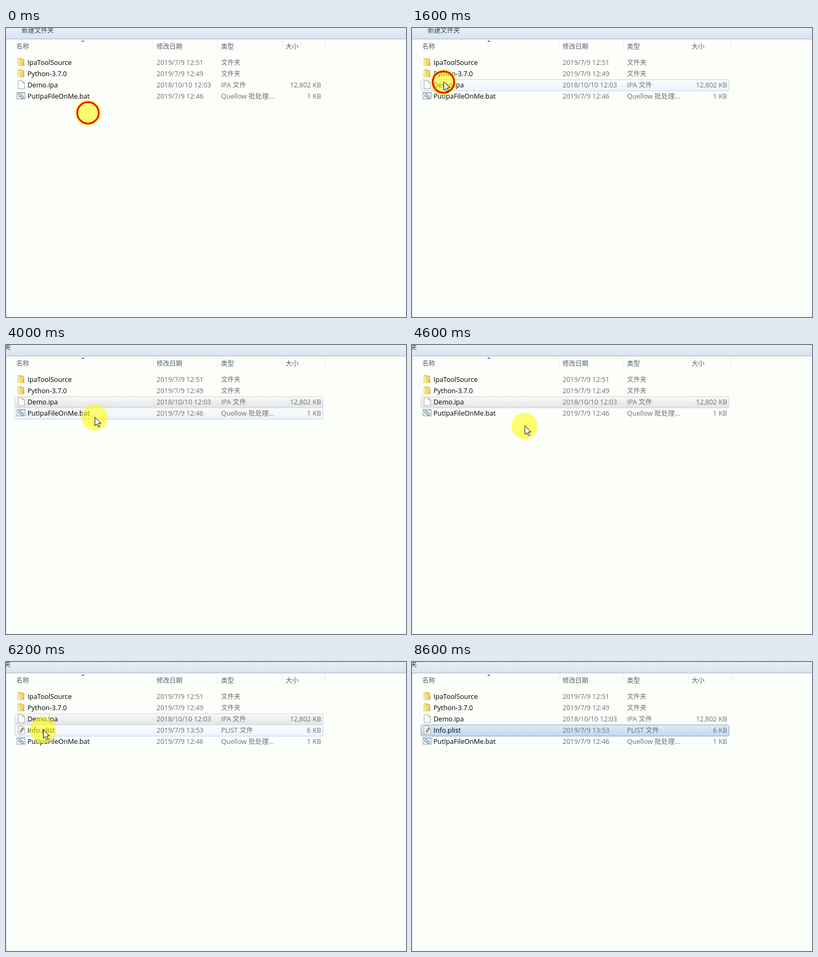
An HTML page with a canvas for the animation above (8800 ms loop, 744 by 540 pixels).

```html
<!DOCTYPE html>
<html lang="zh">
<head>
<meta charset="utf-8">
<style>
html, body { margin: 0; width: 100%; height: 100%; overflow: hidden; background: #fcfefa; }
canvas { display: block; }
</style>
</head>
<body>
<canvas id="stage" width="744" height="540"></canvas>
<script>
const ctx = document.getElementById('stage').getContext('2d');
const LOOP = 8800, STEP = 200;
const ROW_TOP = 54.5, ROW_HEIGHT = 21;
const META = '#6f6f6f';

const folder1 = ['folder', 'IpaToolSource', '2019/7/9 12:51', '文件夹', ''];
const folder2 = ['folder', 'Python-3.7.0', '2019/7/9 12:49', '文件夹', ''];
const demo = ['file', 'Demo.ipa', '2018/10/10 12:03', 'IPA 文件', '12,802 KB'];
const plist = ['plist', 'Info.plist', '2019/7/9 13:53', 'PLIST 文件', '6 KB'];
const batch = ['batch', 'PutIpaFileOnMe.bat', '2019/7/9 12:46', 'Quellow 批处理...', '1 KB'];

// Pointer path: time, x, y
const path = [
  [0, 152.5, 158.5], [600, 146, 152], [800, 146, 152], [1600, 58.5, 101],
  [2000, 60, 102], [2800, 153, 112], [3200, 151, 112], [3400, 150, 130], [3800, 150, 130],
  [4600, 209.5, 151.5], [5000, 205, 165], [6200, 69, 127], [6600, 69, 127],
  [7000, 148.5, 160.5], [7400, 400, 420], [7800, 531, 161], [8400, 124, 515]
];

const between = (t, a, b) => t >= a && t < b;

function pointerAt(t) {
  const i = path.findIndex(p => p[0] > t);
  if (i < 0) return path[path.length - 1].slice(1);
  const [t0, x0, y0] = path[i - 1], [t1, x1, y1] = path[i];
  const k = (t - t0) / (t1 - t0);
  return [x0 + (x1 - x0) * k, y0 + (y1 - y0) * k];
}

function text(str, x, y, color, align = 'left') {
  ctx.font = `${/\w/.test(str) ? 12.5 : 12}px "Open Sans", "Noto Sans CJK SC", "Noto Sans CJK", sans-serif`;
  ctx.textAlign = align;
  ctx.fillStyle = color;
  ctx.fillText(str, x, y);
}

function rect(x, y, w, h, color) {
  ctx.fillStyle = color;
  ctx.fillRect(x, y, w, h);
}

function paint(fill, stroke, width = 1) {
  if (fill) { ctx.fillStyle = fill; ctx.fill(); }
  if (stroke) { ctx.strokeStyle = stroke; ctx.lineWidth = width; ctx.stroke(); }
}

function shape(points, ...style) {
  ctx.beginPath();
  for (const [x, y] of points) ctx.lineTo(x, y);
  ctx.closePath();
  paint(...style);
}

function circle(x, y, r, ...style) {
  ctx.beginPath();
  ctx.arc(x, y, r, 0, Math.PI * 2);
  paint(...style);
}

function fade(y0, y1, top, bottom) {
  const g = ctx.createLinearGradient(0, y0, 0, y1);
  g.addColorStop(0, top);
  g.addColorStop(1, bottom);
  return g;
}

function page(x, y, w, h, fold, fill, edge) {
  shape([[x, y], [x + w - fold, y], [x + w, y + fold], [x + w, y + h], [x, y + h]], fill, edge);
  shape([[x + w - fold, y], [x + w - fold, y + fold], [x + w, y + fold]], '#f2f4f4', edge);
}

const icons = {
  folder(y) {
    shape([[21, y - 7], [26, y - 8], [34, y - 6], [34, y + 7], [22, y + 7]], '#e6c458');
    shape([[21, y - 7], [27, y - 5], [27, y + 8], [21, y + 6]], '#f8e496');
    rect(28, y - 5, 4, 11, '#f2d878');
    rect(32, y + 1, 2, 5, '#cda645');
  },
  file(y) { page(22.5, y - 7.5, 12, 15, 4, '#fefefe', '#a4a8a8'); },
  plist(y) {
    icons.file(y);
    for (const dy of [-3, 0, 3]) rect(25, y + dy, 7, 1, '#b4bab4');
    shape([[25, y + 4], [31, y - 4], [33, y - 2], [27, y + 5]], '#a8955a', '#6c6c54', .6);
  },
  batch(y) {
    rect(20.5, y - 6.5, 15, 13, '#f6fafc');
    ctx.strokeStyle = '#8496a2';
    ctx.lineWidth = 1;
    ctx.strokeRect(20.5, y - 6.5, 15, 12);
    rect(21, y - 6, 14, 2, '#c0d4e0');
    circle(26, y - 1, 2.5, '#dce9f0', '#7493a4', 1.2);
    circle(30.5, y + 2, 2.5, '#dce9f0', '#7493a4', 1.2);
  }
};

const highlights = {
  hover: ['#fafcfe', '#ebf3fb', '#bcd6ee'],
  selected: ['#dfebf8', '#c0d8f2', '#84a4c6'],
  inactive: ['#f7f8f7', '#e3e4e4', '#d4d6d5']
};

function highlight(index, kind) {
  const y = ROW_TOP + index * ROW_HEIGHT;
  const [top, bottom, edge] = highlights[kind];
  ctx.beginPath();
  ctx.roundRect(16.5, y, 573, ROW_HEIGHT, 3);
  paint(fade(y, y + ROW_HEIGHT, top, bottom), edge);
}

function windowChrome(anySelected) {
  rect(0, 0, 744, 540, '#fcfefa');
  rect(0, 0, 744, 20, fade(0, 20, '#e6eef7', '#d9e5f2'));
  rect(0, 20, 744, 1, '#a4b4c6');
  rect(0, 21, 1, 519, '#d3dde6');
  text('新建文件夹', anySelected ? -51 : 29, 9, '#32465c');
  for (const x of [273, 393, 513, 593]) rect(x, 22, 1, 18, '#e4ebf0');
  [['名称', 19], ['修改日期', 280], ['类型', 400], ['大小', 520]].forEach(([s, x]) => text(s, x, 39, '#55606c'));
  shape([[140, 26], [143, 22.5], [146, 26]], '#64809e');
}

function row([icon, name, date, type, size], index) {
  const y = 64 + index * ROW_HEIGHT;
  icons[icon](y);
  text(name, 40, y + 5, '#000');
  text(date, 280, y + 5, META);
  text(type, 400, y + 5, META);
  text(size, 586, y + 5, META, 'right');
}

function dragImage(x, y) {
  const left = Math.round(x) - 54, top = Math.round(y) - 93;
  rect(left, top, 105, 105, fade(top, top + 105, 'rgba(236,242,248,.4)', 'rgba(216,230,244,.4)'));
  rect(left + 104, top, 2, 105, 'rgba(150,160,170,.45)');
  rect(left, top + 104, 106, 2, 'rgba(150,160,170,.45)');
  ctx.globalAlpha = .72;
  page(left + 19.5, top + 9.5, 65, 83, 17, fade(top + 9, top + 93, '#fefefe', '#f0f2f2'), '#a6abab');
  ctx.globalAlpha = 1;
}

function pointer(x, y, pressed, arrow) {
  circle(x, y, 24.5, 'rgba(255,255,0,.56)');
  if (pressed) circle(x, y, 20, null, '#f00000', 3);
  if (!arrow) return;
  const outline = [[0, 0], [0, 16], [3.7, 12.6], [6.3, 18.6], [9, 17.4], [6.4, 11.5], [11.4, 11.5]];
  shape(outline.map(([dx, dy]) => [x + dx + .5, y + dy - .5]), '#fff', '#000');
}

function draw(t) {
  const rows = t < 5200 ? [folder1, folder2, demo, batch] : [folder1, folder2, demo, plist, batch];
  const selected = t < 2200 ? null : t < 6600 ? demo : plist;
  const kind = between(t, 4000, 6600) ? 'inactive' : 'selected';
  const dragging = between(t, 2200, 4000);
  const visible = t < 8600;
  const [x, y] = pointerAt(t);

  windowChrome(selected);
  const hovered = Math.floor((y - 57) / ROW_HEIGHT);
  if (visible && !dragging && x < 590 && rows[hovered] && rows[hovered] !== selected) highlight(hovered, 'hover');
  if (selected) highlight(rows.indexOf(selected), kind);
  rows.forEach(row);
  if (dragging) dragImage(x, y);
  const pressed = t < 200 || between(t, 1600, 2200) || between(t, 6400, 6800);
  if (visible) pointer(x, y, pressed, t >= 200);
}

const start = performance.now();
function tick() {
  const t = (performance.now() - start) % LOOP;
  draw(Math.floor(t / STEP) * STEP);
  requestAnimationFrame(tick);
}
tick();
</script>
</body>
</html>
```
